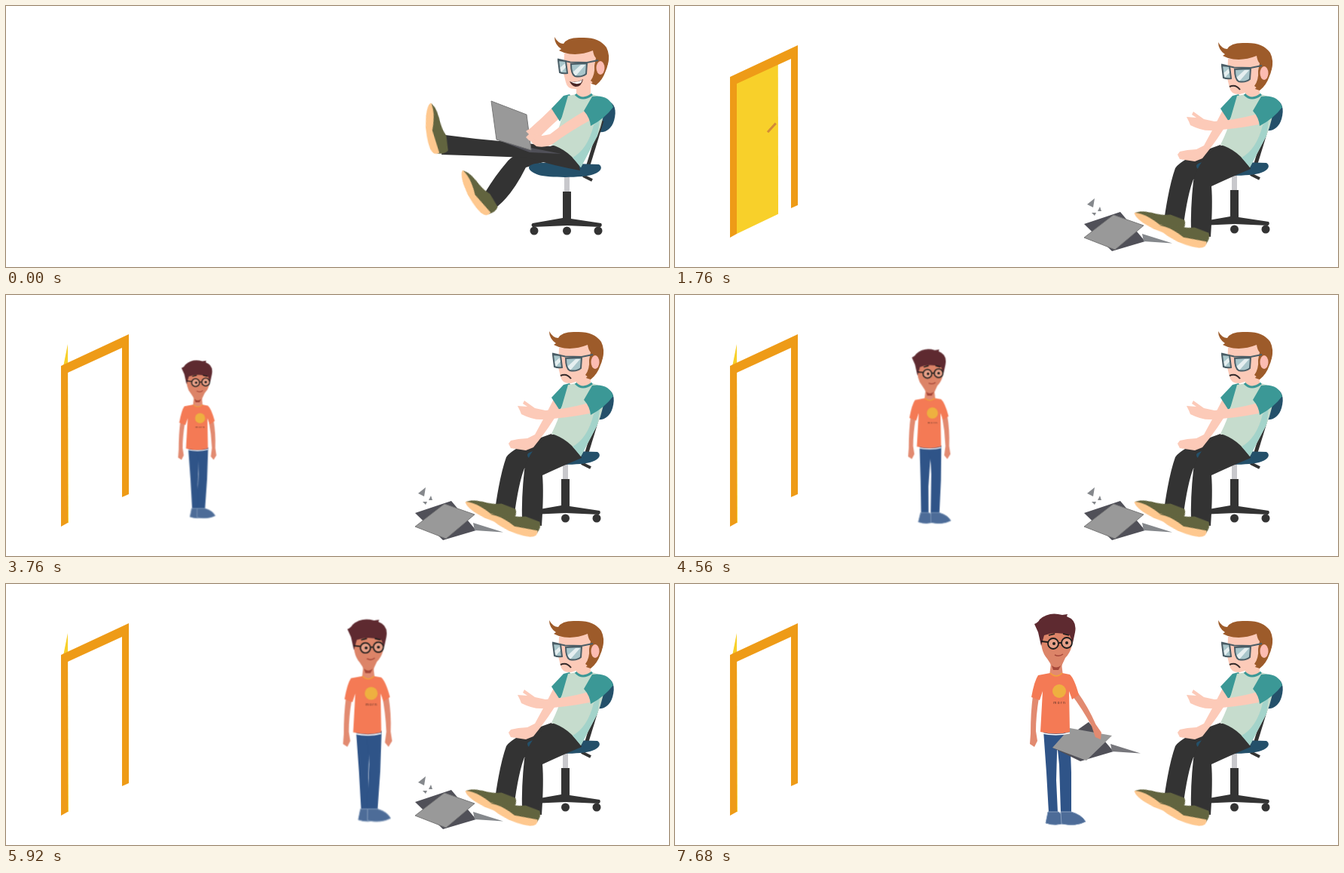
Recreate the animation shown at these times as an HTML page. Size 880 by 346 pixels, loop 8000 ms.

```html
<!DOCTYPE html>
<html lang="en">
<head>
<meta charset="utf-8">
<title>Broken laptop</title>
<style>
html, body { margin: 0; width: 100%; height: 100%; overflow: hidden; background: #fff; }
svg { display: block; width: 880px; height: 346px; }

/* Pose of the visitor */
@property --x { syntax: '<length>'; inherits: true; initial-value: 112px; }
@property --y { syntax: '<length>'; inherits: true; initial-value: 284.3px; }
@property --size { syntax: '<number>'; inherits: true; initial-value: .615; }
@property --left { syntax: '<angle>'; inherits: true; initial-value: 0deg; }
@property --right { syntax: '<angle>'; inherits: true; initial-value: 0deg; }
@property --bend { syntax: '<angle>'; inherits: true; initial-value: 0deg; }
@property --nod { syntax: '<angle>'; inherits: true; initial-value: 0deg; }
@property --reach { syntax: '<angle>'; inherits: true; initial-value: 0deg; }
@property --dip { syntax: '<length>'; inherits: true; initial-value: 0px; }
@property --squash { syntax: '<number>'; inherits: true; initial-value: 1; }
@property --crouch { syntax: '<number>'; inherits: true; initial-value: 1; }

/* One percent of the 8 s loop is one 80 ms step; values hold unless steps() says otherwise. */
svg * { transform-origin: 0 0; }
.slump { d: var(--to); animation: slump 8s step-end infinite; }
.shift { animation: shift 8s step-end infinite; }
.smile { animation: smile 8s step-end infinite; }
.frown { animation: frown 8s step-end infinite; }
.debris { animation: debris 8s step-end infinite; }
.floor { animation: floor 8s step-end infinite; }
.held { animation: held 8s step-end infinite; }
.door { animation: door 8s step-end infinite; }
.swing { d: var(--to); animation: swing 8s step-end infinite; }
.visitor {
  transform: translate(var(--x), var(--y)) scale(var(--size));
  animation: enter 8s step-end infinite, walk 8s step-end infinite,
    gait 8s steps(3) infinite, stoop 8s step-end infinite;
}
.legs { transform: scaleY(var(--crouch)); }
.legL { transform: skewX(var(--left)); transform-origin: 0 -120px; }
.legR { transform: skewX(var(--right)); transform-origin: 0 -120px; }
.upper { transform: translateY(var(--dip)) rotate(var(--bend)) scaleY(var(--squash)); transform-origin: 0 -121px; }
.face { transform: rotate(var(--nod)); transform-origin: 0 -205px; }
.reach { transform: rotate(var(--reach)); transform-origin: 22px -176px; }

@keyframes slump {
  0% { d: var(--from); animation-timing-function: steps(6); }
  6%, 100% { d: var(--to); }
}
@keyframes shift {
  0% { transform: var(--from); animation-timing-function: steps(6); }
  6%, 100% { transform: var(--to); }
}
@keyframes smile { 0% { visibility: visible; } 3%, 100% { visibility: hidden; } }
@keyframes frown { 0% { visibility: hidden; } 3%, 100% { visibility: visible; } }
@keyframes debris { 0% { opacity: 0; } 6%, 100% { opacity: 1; } }
@keyframes floor { 0% { opacity: 1; } 95%, 100% { opacity: 0; } }
@keyframes held { 0% { opacity: 0; } 95%, 100% { opacity: 1; } }

@keyframes door {
  0% { opacity: 0; }
  14% { opacity: 0; animation-timing-function: steps(4); }
  18%, 100% { opacity: 1; }
}
@keyframes swing {
  0% { d: var(--from); }
  20% { d: var(--from); animation-timing-function: steps(8); }
  28%, 100% { d: var(--to); }
}
@keyframes enter {
  0% { opacity: 0; }
  27% { opacity: 0; animation-timing-function: steps(3); }
  30%, 100% { opacity: 1; }
}
@keyframes walk {
  0% { --x: 112px; --y: 284.3px; --size: .615; }
  30% { --x: 112px; --y: 284.3px; --size: .615; animation-timing-function: steps(47); }
  77% { --x: 506px; --y: 317.5px; --size: .981; animation-timing-function: steps(2); }
  79%, 100% { --x: 506px; --y: 320px; --size: 1; }
}
@keyframes gait {
  0%, 31%, 36%, 42%, 47%, 52%, 58%, 63%, 68%, 74% { --left: 0deg; --right: -4deg; }
  33%, 39%, 44%, 50%, 55%, 60%, 66%, 71% { --left: -7deg; --right: 0deg; }
  77%, 100% { --left: 0deg; --right: 0deg; }
}
@keyframes stoop {
  0% { --bend: 0deg; --nod: 0deg; --reach: 0deg; --dip: 0px; --squash: 1; --crouch: 1; }
  79% { --bend: 0deg; --nod: 0deg; --reach: 0deg; --dip: 0px; --squash: 1; --crouch: 1; animation-timing-function: steps(3); }
  82% { --bend: 18deg; --nod: 1deg; --reach: -24deg; --dip: 0px; --squash: .9; --crouch: 1; animation-timing-function: steps(8); }
  90% { --bend: 42deg; --nod: -10deg; --reach: -56deg; --dip: 30px; --squash: .9; --crouch: .76; }
  95% { --bend: 5deg; --nod: 0deg; --reach: -26deg; --dip: 0px; --squash: 1; --crouch: 1; }
  96%, 100% { --bend: 0deg; --nod: 0deg; --reach: -26deg; --dip: 0px; --squash: 1; --crouch: 1; }
}

.black { fill: #333; }
.skin { fill: #fccab8; }
.shirt { fill: #c6dccd; }
.fold { fill: #a3d3ca; }
.sleeve { fill: #3b9896; }
.pad { fill: #24506a; }
.hair { fill: #9d5b2a; }
.rim { fill: none; stroke: #4a5d66; stroke-width: 2; }
.lens { fill: #a9c6cb; }
.dark { fill: #505058; }
.tan { fill: #e28a70; }
.jeans { fill: #2f5488; }
.sneaker { fill: #4d6c98; stroke: #89a0bf; }
</style>
</head>
<body>
<svg viewBox="0 0 880 346">
  <defs>
    <g id="shoe">
      <path fill="#62643f" d="M-66 -2Q-60 -9 -40 -10Q-28 -11 -20 -15L0 -14Q5 -8 1 2L-30 4Z"/>
      <path fill="#fec88f" d="M-66 -3Q-50 -6 -30 2L1 -2Q4 6 -6 9Q-28 13 -50 7Q-66 2 -66 -3Z"/>
    </g>
  </defs>

  <g class="door">
    <path class="swing" fill="#f8d02a" style="--from:path('M82 103L155 70L155 267L82 302Z');--to:path('M76 95L82 65L83 302L82 302Z')"/>
    <path class="swing" fill="none" stroke="#d38a38" stroke-width="3" style="--from:path('M138 168L152 154');--to:path('M78 165L79 160')"/>
    <path fill="#ee9b17" d="M73 94L163 52V264L154 268V70L82 103V302L73 307Z"/>
  </g>

  <!-- seated man -->
  <path class="slump black" style="--from:path('M700 190Q672 196 664 208Q650 224 636 247L652 266Q672 250 690 214L720 205Z');--to:path('M724 184Q672 202 664 215Q655 240 648 292L674 297Q680 250 688 230L735 210Z')"/>
  <g class="shift" style="--from:translate(2px,2px);--to:translate(0px,0px)">
    <path class="pad" d="M796 124C806 126 809 136 805 150C802 160 794 167 784 165Z"/>
    <path stroke="#333" stroke-width="5" d="M789 150L769 215"/>
    <path fill="#c8c8cc" d="M739 222H746V246H739Z"/>
    <path class="black" d="M737 244H748V280L788 286Q790 289 787 291L743 289L697 291Q694 288 697 286L737 279Z"/>
    <path stroke="#333" stroke-width="4" d="M764 223L776 229"/>
    <g class="black"><circle cx="699" cy="296" r="5.5"/><circle cx="742.5" cy="296" r="5.5"/><circle cx="784" cy="296" r="5.5"/></g>
    <path class="pad" d="M692 212C692 207 708 205 720 206L785 208C790 211 789 217 778 221C765 226 720 226 705 222C696 219 692 215 692 212Z"/>
  </g>
  <path class="slump black" style="--from:path('M722 186Q690 181 655 179Q620 176 583 171L578 197Q640 199 692 201Q728 212 762 218Q758 192 735 182Z');--to:path('M722 186Q694 204 688 232Q684 268 685 303L711 306Q714 262 712 239Q740 226 764 216Q758 190 735 182Z')"/>

  <g class="floor">
    <path class="slump dark" style="--from:path('M651 177L697 188L737 196L695 194Z');--to:path('M543 289L591 273L624 312L580 325Z')"/>
    <path class="slump" fill="#999" stroke="#777" style="--from:path('M651 177L644 126L691 144L697 191Z');--to:path('M543 307L582 277L622 291L584 323Z')"/>
    <g class="debris" fill="#85888c">
      <path d="M620 302L660 314.500L622 312Z"/>
      <path d="M557 255L547 263L555 267ZM564 266L561 272L566 272ZM553 274L559 274L557 278Z"/>
    </g>
  </g>

  <g class="shift" style="--from:translate(641px,274px) rotate(56deg);--to:translate(672px,297px) rotate(18deg)"><use href="#shoe"/></g>
  <g class="shift" style="--from:translate(573px,194px) rotate(80deg);--to:translate(704px,314px) rotate(18deg)"><use href="#shoe"/></g>

  <path class="slump skin" style="--from:path('M728 132Q712 148 696 162L690 166L694 170L690 174L694 178L698 180L704 180L712 170Q726 156 738 146Z');--to:path('M728 136Q716 160 702 185L692 190L680 191L670 193L667 197L670 203L690 206L700 202Q722 175 736 150Z')"/>
  <path class="sleeve" d="M748 117L740 119L724 136L735 153Q744 138 750 120Z"/>
  <path class="skin" d="M757 104H776V122Q766 126 757 120Z"/>
  <path class="shirt" d="M746 119L757 117Q766 127 778 117L796 123Q794 150 785 172L763 214Q746 190 724 184Q734 164 737 150Z"/>
  <path class="fold" d="M788 150L785 172L763 214L752 201Q772 190 780 158Z"/>
  <path fill="none" stroke="#3b9896" stroke-width="3" d="M756 117Q765 127 778 117"/>
  <path class="slump skin" style="--from:path('M770 138Q745 152 722 170L712 172L700 170L697 174L704 178L697 180L700 183L704 186Q715 188 724 184Q750 165 778 150Z');--to:path('M774 143Q740 152 716 153L702 150L688 140L686 144L692 148L679 147L682 153L684 158Q700 166 712 165Q745 163 775 157Z')"/>
  <path class="sleeve" d="M778 120Q800 117 806 134Q795 149 776 159Q775 148 767 139Z"/>

  <g class="shift" style="--from:translate(7px,-7px);--to:translate(0px,0px)">
    <path class="hair" d="M760 60L786 60Q797 75 789 93Q785 105 776 112L764 108Z"/>
    <path class="skin" d="M734 70L778 62L780 96Q775 108 766 112L750 117Q738 118 736 108L733 96Z"/>
    <path class="hair" d="M721 48Q726 57 733 57Q738 48 757 49Q780 48 790 62Q795 72 792 84L774 110L769 106Q775 98 774 86L776 76Q773 73 772 66Q752 74 734 69L727 66L730 64Q721 58 721 48Z"/>
    <ellipse cx="782" cy="89" rx="5.500" ry="9" fill="#fcbcb2"/>
    <path class="lens" d="M726 79L736 80L738 96Q732 97 728 95ZM743 84L764 83L763 97Q757 102 748 100Q743 97 743 84Z"/>
    <path fill="#e6eff0" d="M728 89L735 83L736 88L730 95ZM745 95L756 85L762 85L749 100Z"/>
    <path class="rim" d="M726 79L736 80L738 96Q732 97 728 95ZM743 84L764 83L763 97Q757 102 748 100Q743 97 743 84ZM725 77.500L742 81.500L764 82L779 79"/>
    <path class="frown" fill="none" stroke="#332a2a" stroke-width="2" d="M736 107Q744 103 750 111"/>
    <g class="smile">
      <path fill="#4a2626" d="M741 107Q751 109 759 104Q757 114 749 114Q744 113 741 107Z"/>
      <path fill="#fff" d="M742 107Q751 109 758 105L756 109Q749 112 742 107Z"/>
    </g>
  </g>

  <!-- visitor, origin on the floor below the body -->
  <g class="visitor">
    <g class="legs">
      <g class="legL">
        <path class="jeans" d="M-17 -126H3L1 -96L0 -60L2 -17H-10L-13 -70Z"/>
        <path class="sneaker" d="M-11 -18H3Q12 -12 13 -4Q0 2 -14 -3Z"/>
      </g>
      <g class="legR">
        <path class="jeans" d="M-3 -126H18L20 -70V-17H6L4 -80L2 -100Z"/>
        <path class="sneaker" d="M6 -18H20Q34 -14 39 -5Q26 2 7 -2Z"/>
      </g>
    </g>
    <g class="held">
      <g transform="translate(-548 -410)">
        <path class="dark" d="M543 307L591 273L624 312L580 325Z"/>
        <path fill="#77777c" d="M620 302L660 314.500L622 312Z"/>
        <path fill="#999" d="M543 307L566 281L622 291L588 324Z"/>
      </g>
    </g>
    <g class="upper">
      <path class="tan" d="M-31 -172L-23 -169Q-27 -145 -27 -125L-25 -112L-29 -104L-35 -108L-34 -122Q-34 -150 -31 -172Z"/>
      <path class="tan reach" d="M19 -176L28 -174Q32 -150 31 -125L33 -112L28 -104L23 -110L25 -125Q24 -150 19 -176Z"/>
      <path class="tan" d="M-7 -215H7L9 -198Q0 -190 -9 -198Z"/>
      <path fill="#f47a55" d="M-8 -202L-24 -199Q-29 -192 -33 -170L-22 -166L-18 -178L-21 -124Q0 -119 18 -124L17 -178L21 -167L30 -173Q24 -195 18 -200L8 -202Q0 -194 -8 -202Z"/>
      <path fill="none" stroke="#f2a03c" stroke-width="1.500" d="M-8 -202Q0 -194 8 -202"/>
      <path fill="none" stroke="#fff" stroke-width="1.500" d="M-20 -122.500Q0 -118 18 -122.500"/>
      <circle cx="4" cy="-178" r="9" fill="#eeb040"/>
      <text x="4" y="-161" font-family="Arial, 'Liberation Sans', sans-serif" font-size="5" text-anchor="middle" fill="#5a3328">m o r n</text>
      <g class="face">
        <path fill="#dc8468" d="M-20 -256H21Q24 -234 12 -222Q8 -214 6 -208L-5 -208Q-8 -216 -12 -221Q-22 -232 -20 -256Z"/>
        <path fill="#a5483a" d="M-6 -212Q0 -207 6 -212L3 -206H-4Z"/>
        <path fill="#5e2a30" d="M-29 -267Q-24 -269 -22 -273Q-10 -284 8 -279L15 -280L14 -277Q28 -272 25 -256L22 -242L18 -252Q0 -258 -16 -252L-20 -238L-24 -256Z"/>
        <g fill="#e6a088" stroke="#1d1d1d" stroke-width="1.800">
          <circle cx="-4" cy="-241" r="7"/><circle cx="14" cy="-242" r="7"/>
          <path fill="none" d="M-20 -244L-11 -243M3.500 -242H6.500M-10 -252L-2 -254M9 -254L17 -252"/>
        </g>
        <circle cx="-3" cy="-241" r="2" fill="#1d1d1d"/><circle cx="14" cy="-242" r="2" fill="#1d1d1d"/>
        <path fill="none" stroke="#a5483a" stroke-width="1.500" d="M-2 -226Q4 -223 9 -227"/>
      </g>
    </g>
  </g>
</svg>
</body>
</html>
```
